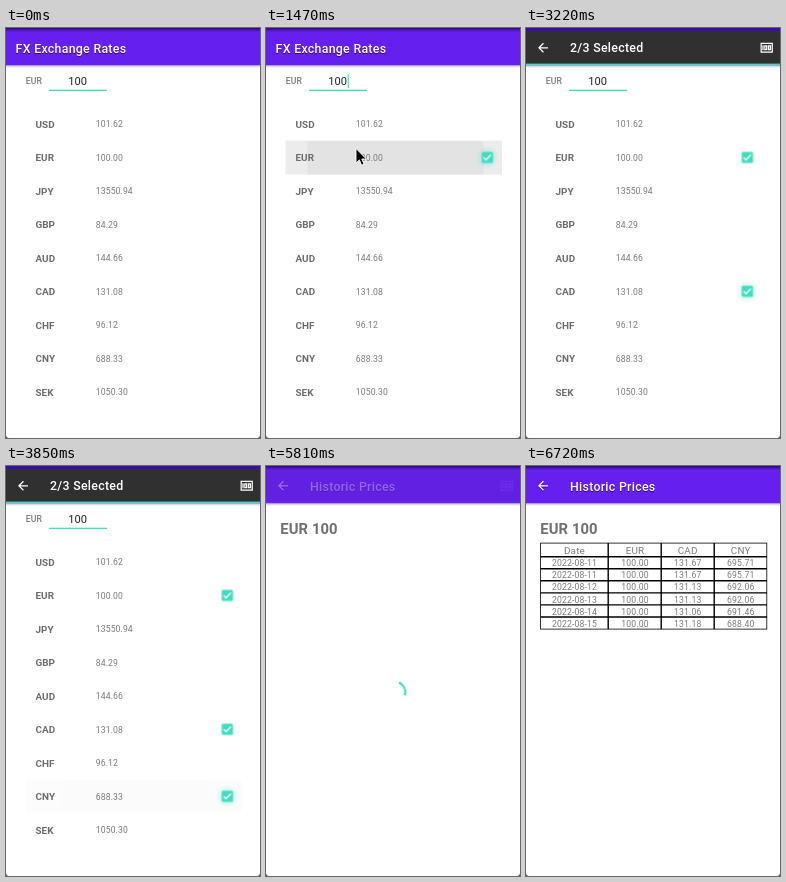
Animation, 254 px wide and 410 px high, one loop 7.49 s. Source, as an HTML page:

```html
<!DOCTYPE html>
<html lang="en">
<head>
<meta charset="utf-8">
<title>FX Exchange Rates</title>
<style>
  html, body { margin: 0; width: 100%; height: 100%; overflow: hidden; background: #fff; }
  svg { display: block; }
  text { font-family: Roboto, sans-serif; fill: #7a7a7a; letter-spacing: .1px; }
  .title { font-size: 12.35px; font-weight: 500; letter-spacing: .29px; fill: #fff; }
  .code { font-size: 9.9px; font-weight: 700; fill: #6c6c6c; }
  .value { font-size: 8.64px; }
  .unit { font-size: 8.64px; font-weight: 500; }
  .amount { font-size: 11.1px; fill: #222; }
  .heading { font-size: 14.8px; font-weight: 700; fill: #707070; }
  .cell { font-size: 8.64px; letter-spacing: .14px; text-anchor: middle; }
  .head { font-size: 9.87px; letter-spacing: .2px; }
  .icon { fill: #fff; }
  #home, #detail { filter: drop-shadow(.8px 1px .7px rgba(25, 0, 80, .7)); }
  #arc { fill: none; stroke: #3fdcc0; stroke-width: 2.3; transform-origin: 127px 227px; }
</style>
</head>
<body>
<svg id="stage" width="254" height="410" viewBox="0 0 254 410">
  <defs>
    <linearGradient id="shade" x2="0" y2="1">
      <stop stop-color="#1a0050" stop-opacity=".3"/>
      <stop offset="1" stop-color="#1a0050" stop-opacity="0"/>
    </linearGradient>
    <linearGradient id="edge" x2="0" y2="1">
      <stop stop-color="#1a0050" stop-opacity=".75"/>
      <stop offset="1" stop-color="#1a0050" stop-opacity="0"/>
    </linearGradient>
    <radialGradient id="glow">
      <stop offset=".4" stop-color="#46e2c4" stop-opacity=".28"/>
      <stop offset="1" stop-color="#46e2c4" stop-opacity="0"/>
    </radialGradient>
    <path id="back" transform="translate(9.6 12.4) scale(.617)"
      d="M20 11H7.83l5.59-5.59L12 4l-8 8 8 8 1.41-1.41L7.83 13H20z"/>
  </defs>
  <rect width="254" height="410" fill="#fff"/>

  <g id="list">
    <text class="unit" x="19.7" y="56.4">EUR</text>
    <text class="amount" x="62.2" y="57">100</text>
    <rect x="43" y="61.7" width="58" height="1.4" fill="#42dcc0"/>
    <rect id="caret" x="81.6" y="46.3" width="1.2" height="13.7" fill="#42dcc0"/>
    <g id="rows"></g>
  </g>

  <g id="history">
    <text class="heading" x="14.3" y="68">EUR 100</text>
    <circle id="arc" cx="127" cy="227" r="12.3" pathLength="360"/>
    <g id="table"></g>
  </g>

  <rect y="37" width="254" height="3" fill="url(#shade)"/>
  <rect width="254" height="37.2" fill="#651fee"/>
  <rect width="254" height="4" fill="url(#edge)"/>
  <g id="home">
    <text class="title" x="9.6" y="24.6">FX Exchange Rates</text>
  </g>
  <g id="detail">
    <use href="#back" class="icon"/>
    <text class="title" x="44" y="24.6">Historic Prices</text>
  </g>
  <g id="action">
    <rect y="3" width="254" height="33" fill="#303030"/>
    <rect width="254" height="3" fill="#3a0ca8"/>
    <rect y="35.6" width="254" height="1.5" fill="#42dcc0"/>
    <use href="#back" class="icon"/>
    <g id="counts"></g>
    <path class="icon" fill-rule="evenodd" transform="translate(233.3 12.4) scale(.617)"
      d="M2 4h20v16H2zM4 6v12h16V6zM5 8h2v8H5zM8 8h5v8H8zM10 10v4h1v-4zM14 8h5v8h-5zM16 10v4h1v-4z"/>
  </g>

  <path id="pointer" d="M90 120.500v14.500l3.400-3.100 2.200 5.300 2.400-1-2.200-5.200h4.600z"
    fill="#000" stroke="#fff" stroke-width=".9"/>
  <path d="M0 407.5V410H2.5Q.5 409.5 0 407.5M254 407.5V410h-2.5Q253.5 409.5 254 407.5" fill="#555"/>
</svg>
<script>
const LOOP = 7490;
const $ = id => document.getElementById(id);

function add(parent, tag, attrs, text = '') {
  const el = document.createElementNS('http://www.w3.org/2000/svg', tag);
  for (const key in attrs) el.setAttribute(key, attrs[key]);
  el.textContent = text;
  return parent.appendChild(el);
}

// Linear track through [time, value] points; equal times make a jump.
function track(el, prop, points) {
  const all = [...points];
  if (all[0][0] > 0) all.unshift([0, all[0][1]]);
  const last = all[all.length - 1];
  if (last[0] < LOOP) all.push([LOOP, last[1]]);
  el.animate(all.map(([t, v]) => ({ offset: t / LOOP, [prop]: v })),
    { duration: LOOP, iterations: Infinity });
}

// Visible only inside the given [from, to] spans.
function show(el, ...spans) {
  const points = [];
  for (const [from, to] of spans) {
    if (from > 0) points.push([from, 0]);
    points.push([from, 1], [to, 1]);
    if (to < LOOP) points.push([to, 0]);
  }
  track(el, 'opacity', points);
}

const rates = {
  USD: '101.62', EUR: '100.00', JPY: '13550.94', GBP: '84.29', AUD: '144.66',
  CAD: '131.08', CHF: '96.12', CNY: '688.33', SEK: '1050.30'
};
// press: touch down, tick: box checked, rest: glow gone
const picks = {
  EUR: { press: 1190, tick: 1400, lift: 1600, gone: 1890, rest: 2240, tint: .075 },
  CAD: { press: 2450, tick: 2590, lift: 2520, gone: 2730, rest: 3430, tint: .04 },
  CNY: { press: 3640, tick: 3850, lift: 3710, gone: 3920, rest: 4550, tint: .04 }
};

function addPick(y, p) {
  const band = add($('rows'), 'svg', { x: 19.5, y: y - 17, width: 216.5, height: 33.5 });
  add(band, 'rect', { width: 217, height: 34, 'fill-opacity': p.tint });
  const ripple = add(band, 'circle', { cx: 110, cy: 17, r: 30, 'fill-opacity': p.tint / 2 });
  track(ripple, 'r', [[p.press, '30px'], [p.press + 280, '89px'], [p.gone, '130px']]);
  track(band, 'opacity', [[p.press, 0], [p.press + 70, 1], [p.lift, 1], [p.gone, 0]]);

  const box = add($('rows'), 'g', { transform: `translate(221.3 ${y - .3})` });
  const glow = add(box, 'circle', { r: 12, fill: 'url(#glow)' });
  add(box, 'rect', { x: -5.2, y: -4.8, width: 11.4, height: 11.4, rx: 2, fill: '#46e2c4', opacity: .25 });
  add(box, 'rect', { x: -5.6, y: -5.6, width: 11.2, height: 11.2, rx: 1.4, fill: '#42dcc0' });
  add(box, 'path', { d: 'M-3.6 .1L-1.3 2.5L3.7 -2.6', fill: 'none', stroke: '#fff', 'stroke-width': 1.3 });
  show(box, [p.tick, 5670]);
  track(glow, 'opacity', [[p.tick, 1], [p.rest - 210, .8], [p.rest, 0]]);
}

Object.entries(rates).forEach(([code, rate], i) => {
  const y = 96.2 + i * 33.47;
  if (picks[code]) addPick(y, picks[code]);
  add($('rows'), 'text', { class: 'code', x: 29.4, y: y + 3.6 }, code);
  add($('rows'), 'text', { class: 'value', x: 89.8, y: y + 3.2 }, rate);
});

[[1470, 2730], [2730, 3920], [3920, 5740]].forEach((span, i) => {
  const label = add($('counts'), 'text', { class: 'title', x: 44, y: 24.4 }, `${i + 1}/3 Selected`);
  show(label, span);
});

const table = [
  'Date EUR CAD CNY',
  '2022-08-11 100.00 131.67 695.71',
  '2022-08-11 100.00 131.67 695.71',
  '2022-08-12 100.00 131.13 692.06',
  '2022-08-13 100.00 131.13 692.06',
  '2022-08-14 100.00 131.06 691.46',
  '2022-08-15 100.00 131.18 688.40'
];
const centers = [48.5, 109, 161.7, 214.7];
table.forEach((line, r) => line.split(' ').forEach((s, c) =>
  add($('table'), 'text', {
    class: r ? 'cell' : 'cell head', x: centers[c], y: r ? 88.3 + r * 12.05 : 87.7
  }, s)));
let grid = '';
for (let r = 0; r < 6; r++) grid += `M14.6 ${90.7 + r * 12.05}H241`;
for (const x of [82.2, 135.2, 188.2]) grid += `M${x} 77V163`;
add($('table'), 'path', { d: grid, stroke: '#000', 'stroke-width': 1.4, fill: 'none' });
add($('table'), 'rect', {
  x: 14.6, y: 77.1, width: 226.2, height: 86, stroke: '#000', 'stroke-width': .8, fill: 'none'
});

show($('list'), [0, 5670]);
show($('history'), [5670, LOOP]);
show($('home'), [0, 5600]);
show($('table'), [6650, LOOP]);
show($('pointer'), [1190, 1680]);
show($('caret'), [140, 630], [1190, 1750], [2240, 2730], [3290, 3780], [4340, 4830], [5390, 5670]);
track($('detail'), 'opacity', [[5740, 0], [5950, 1]]);
track($('action'), 'opacity', [[1470, 0], [1750, 1], [5600, 1], [5825, 0]]);

// Spinner: the tail turns while the arc grows, then shrinks.
show($('arc'), [5740, 6650]);
track($('arc'), 'transform', [[5740, -80], [5810, -60], [6200, 20], [6650, 330]]
  .map(([t, a]) => [t, `rotate(${a}deg)`]));
track($('arc'), 'strokeDasharray', [[5740, 30], [5810, 70], [6200, 250], [6650, 40]]
  .map(([t, n]) => [t, `${n} 400`]));
</script>
</body>
</html>
```
